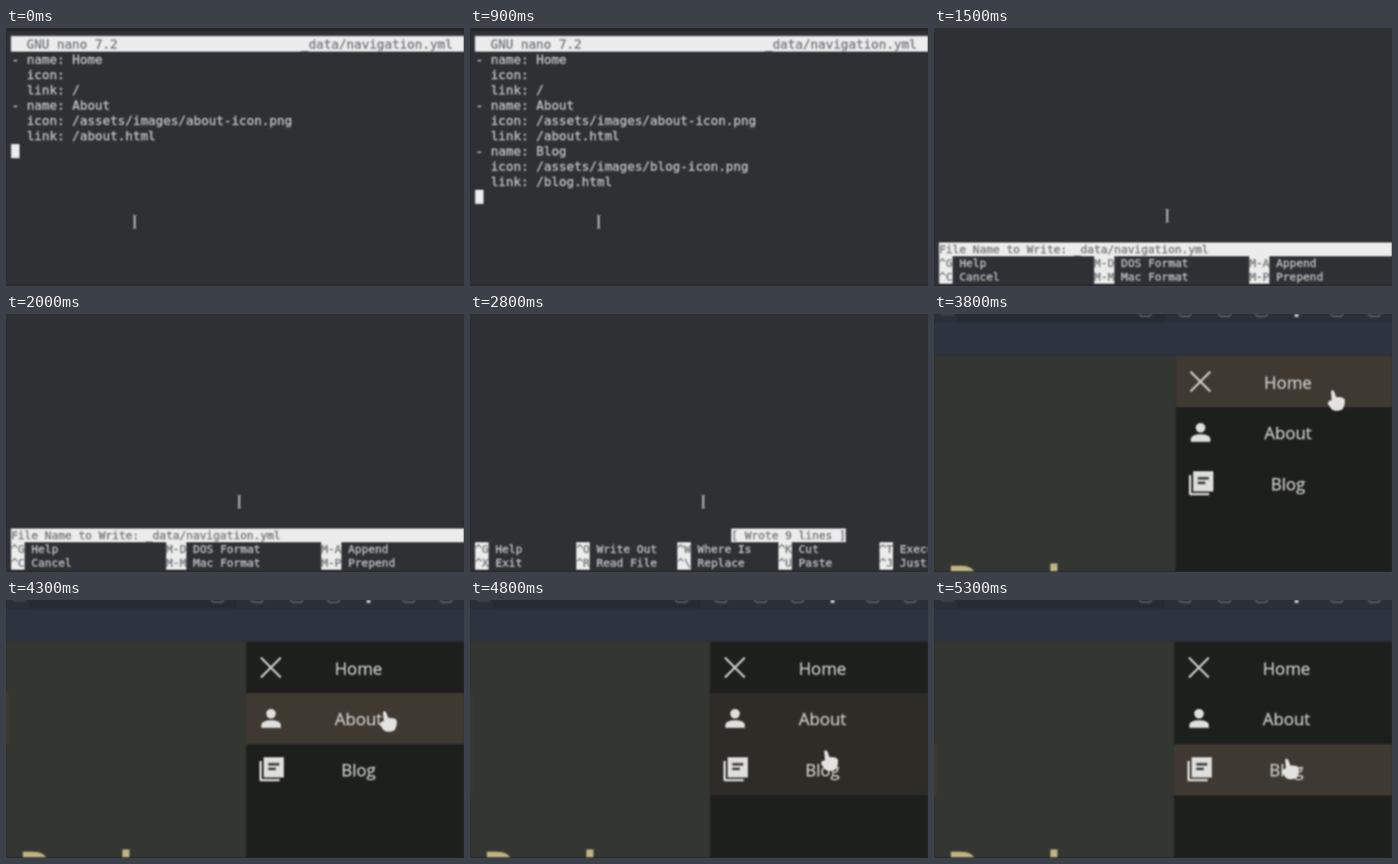
Write an HTML page with a canvas that moves like this. It is 600 by 338 pixels and loops after 5400 ms.

```html
<!DOCTYPE html>
<html lang="en">
<head>
<meta charset="utf-8">
<style>
html, body { margin: 0; width: 100%; height: 100%; overflow: hidden; background: #2d2f32; }
canvas { display: block; filter: blur(.8px); }
</style>
</head>
<body>
<canvas id="stage" width="600" height="338"></canvas>
<script>
const ctx = document.getElementById('stage').getContext('2d');
const LOOP = 5400, STEP = 100;
const MONO = '"DejaVu Sans Mono", monospace', SANS = '"Open Sans", "Noto Sans", sans-serif';
const BG = '#2e3033', FG = '#c2c3c4', BAR = '#ececec', INK = '#77787a';

const FIRST = ['- name: Home', '  icon:', '  link: /', '- name: About',
  '  icon: /assets/images/about-icon.png', '  link: /about.html'].join('\n') + '\n';
const ADDED = ['- name: Blog', '  icon: /assets/images/blog-icon.png', '  link: /blog.html'].join('\n') + '\n';

const clamp = v => Math.max(0, Math.min(1, v));
const smooth = v => { v = clamp(v); return v * v * (3 - 2 * v); };

function box(x, y, w, h, color) {
  ctx.fillStyle = color;
  ctx.fillRect(x, y, w, h);
}

// a thin outline thickens the strokes a little
function text(str, x, y, font, color, align = 'left') {
  ctx.font = font;
  ctx.fillStyle = ctx.strokeStyle = color;
  ctx.lineWidth = 0.4;
  ctx.textAlign = align;
  ctx.fillText(str, x, y);
  ctx.strokeText(str, x, y);
}

function shape(path, color) {
  ctx.fillStyle = color;
  ctx.fill(new Path2D(path));
}

function iBeam(x, y) {
  box(x - 1.2, y - 9, 2.6, 18, '#b4b4b4');
  box(x - 2.5, y - 9, 5, 1.5, '#8c8c8c');
  box(x - 2.5, y + 7.5, 5, 1.5, '#8c8c8c');
}

function editor(t) {
  const font = '16.5px ' + MONO, cw = 9.93;
  box(0, 0, 600, 338, BG);
  box(0, 0, 600, 4, '#232427');
  box(6.5, 10.5, 593.5, 20.5, BAR);
  text('GNU nano 7.2', 27, 27, font, INK);
  text('_data/navigation.yml', 386.5, 27, font, INK);
  const typed = Math.round(ADDED.length * clamp((t - 100) / 700));
  const lines = (FIRST + ADDED.slice(0, typed)).split('\n');
  lines.forEach((line, i) => text(line, 7.3, 47 + 20 * i, font, FG));
  const last = lines.length - 1;
  box(6.7 + lines[last].length * cw, 32 + 20 * last, 11, 18.5, '#ededed');
  iBeam(168.5, 254);
}

function saving(t) {
  const font = '14.67px ' + MONO, cw = 8.83;
  const put = (str, col, row, inverse) => {
    const x = 6.7 + col * cw, y = 281 + 18 * row;
    if (inverse) box(x, y, str.length * cw, 18, BAR);
    text(str, x, y + 14, font, inverse ? INK : FG);
  };
  const menu = (rows, width) => rows.forEach((row, r) => row.forEach((item, c) => {
    const [key, label] = item.split('|');
    put(key, c * width, r + 1, true);
    put(label, c * width + key.length + 1, r + 1);
  }));
  box(0, 0, 600, 338, BG);
  iBeam(305.5, 246);
  if (t < 2500) {
    box(6.7, 281, 593.3, 18, BAR);
    put('File Name to Write: _data/navigation.yml', 0, 0, true);
    menu([['^G|Help', 'M-D|DOS Format', 'M-A|Append'],
          ['^C|Cancel', 'M-M|Mac Format', 'M-P|Prepend']], 23);
  } else {
    put('[ Wrote 9 lines ]', 38, 0, true);
    menu([['^G|Help', '^O|Write Out', '^W|Where Is', '^K|Cut', '^T|Execute'],
          ['^X|Exit', '^R|Read File', '^\\|Replace', '^U|Paste', '^J|Justify']], 15);
  }
}

// time, x and y of the fingertip
const HAND = [[3100, 520, 96], [3300, 527, 84], [3600, 527, 84], [3800, 522, 101],
  [4050, 512, 121], [4700, 470, 188], [4800, 466, 198], [5000, 462, 209], [5400, 462, 209]];

function hand(t) {
  const i = HAND.findIndex(k => k[0] > t);
  const [t0, x0, y0] = HAND[i - 1], [t1, x1, y1] = HAND[i];
  const p = (t - t0) / (t1 - t0);
  ctx.save();
  ctx.translate(x0 + (x1 - x0) * p, y0 + (y1 - y0) * p);
  shape('M-2 0Q0-2 2 0L5 8Q13 7 16 11Q17 18 13 24Q5 28-1 24L-6 17Q-6 12-1 12Z', '#e2e2e0');
  ctx.restore();
}

// label and the time span under the pointer
const ITEMS = [['Home', 3600, 4050], ['About', 4050, 4700], ['Blog', 4700, 9999]];

function panel(t) {
  const p = smooth((t - 3334) / 490);
  if (!p) return;
  const white = '#dededc';
  const highlight = (from, to) =>
    `rgba(62,58,50,${clamp((t - from) / 200) - clamp((t - to) / 200)})`;
  ctx.save();
  ctx.translate(600 - 285.5 * p, 0);
  box(0, 55, 290, 283, `rgba(29,31,28,${0.8 + 0.2 * p})`);
  ITEMS.forEach(([label, from, to], i) => {
    box(0, 55 + 67 * i, 290, 67, highlight(from, to));
    text(label, 147.3, 97.5 + 66.7 * i, '22px ' + SANS, '#cbcbc8', 'center');
  });
  ctx.strokeStyle = '#c9c9c6';
  ctx.lineWidth = 2.8;
  ctx.stroke(new Path2D('M19.5 75.5L45.5 101.5M45.5 75.5L19.5 101.5'));
  shape('M39 149a6.3 6.3 0 1 1-12.6 0a6.3 6.3 0 1 1 12.6 0M20 167.5V163Q22 157.5 32.7 157.5Q44 157.5 45.5 163V167.5Z', white);
  box(23, 206, 26.5, 26.5, white);
  shape('M17.5 211H20.5V234.5H44V237.5H19.5Q17.5 237.5 17.5 235.5Z', white);
  box(29, 213.5, 14.5, 3.5, '#454542');
  box(29, 219.5, 10, 3.5, '#454542');
  ctx.restore();
  ITEMS.slice(1).forEach(([, from, to], i) => box(0, 122 + 67 * i, 4, 67, highlight(from, to)));
}

function browser(t) {
  box(0, 0, 600, 338, '#343632');
  box(0, 0, 600, 55, '#2d343f');
  box(0, 0, 600, 12, '#2a3039');
  box(30, 0, 272, 11, '#262b32');
  box(0, 53, 600, 2, '#2a2f36');
  ctx.strokeStyle = '#72757b';
  ctx.lineWidth = 1.6;
  [277, 329, 381, 429, 528, 577].forEach(x => {
    ctx.beginPath();
    ctx.roundRect(x - 8, -12, 16, 15, 4);
    ctx.stroke();
  });
  box(472.5, 0, 5, 4, '#c4c5c8');
  box(9, 0, 17, 2, '#454950');
  text('Dead', 17, 370.5, 'bold 58px ' + SANS, '#bfb483');
  ctx.beginPath();
  ctx.roundRect(474, 64, 140, 50, 6);
  ctx.fillStyle = '#4c4d4a';
  ctx.fill();
  text('Navigation', 489, 97.5, '21.5px ' + SANS, '#c3c3c0');
  panel(t);
  hand(t);
}

function draw(now) {
  const t = Math.floor(now % LOOP / STEP) * STEP;
  (t < 1500 ? editor : t < 3100 ? saving : browser)(t);
  box(0, 337, 600, 1, '#202122');
  requestAnimationFrame(draw);
}
requestAnimationFrame(draw);
</script>
</body>
</html>
```
